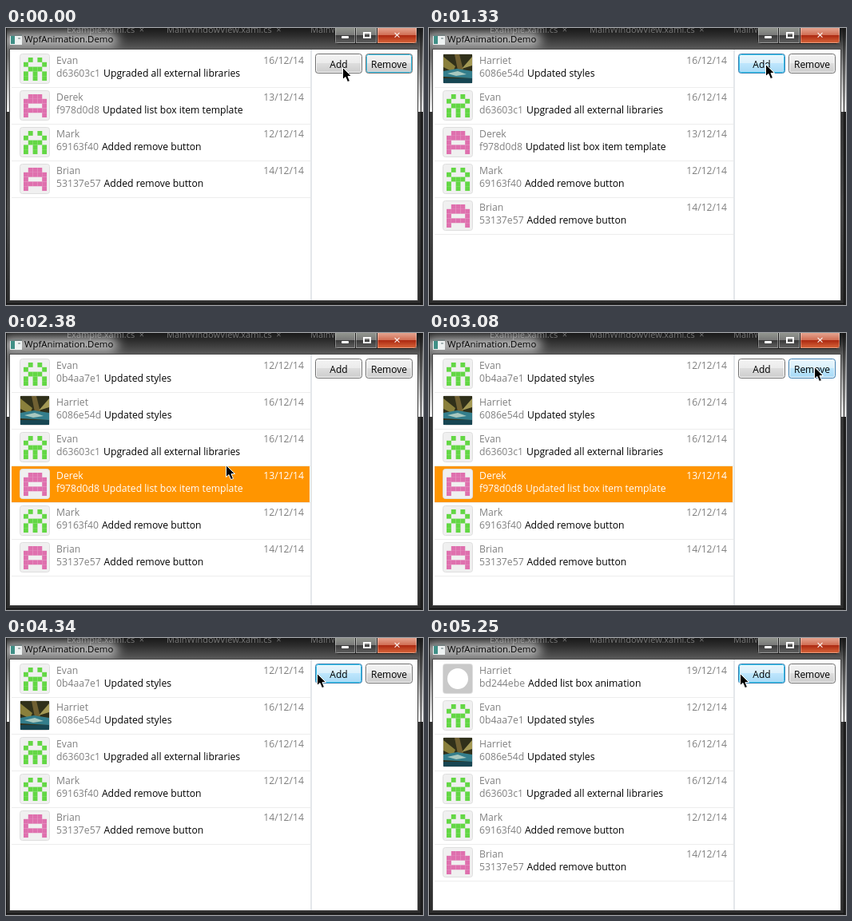
An HTML page with a canvas for the animation above (5.88 s loop, 522 by 347 pixels).

```html
<!DOCTYPE html>
<html lang="en">
<head>
<meta charset="utf-8">
<title>WpfAnimation.Demo</title>
<style>
html, body { margin: 0; width: 100%; height: 100%; overflow: hidden; background: #222; }
canvas { display: block; width: 522px; height: 347px; }
</style>
</head>
<body>
<canvas id="stage" width="522" height="347"></canvas>
<script>
const ctx = document.getElementById('stage').getContext('2d');
const LOOP = 5880, TICK = 70, ROW = 46, TOP = 28;
const GROW = 250, FADE = 400;
const SELECT = 2310, REMOVE = 3360;
const FONT = '"Open Sans", "Noto Sans", sans-serif';

const GREEN = { color: '#63d744', rows: ['.x.x.', 'x...x', '.xxx.', 'x.x.x', 'x.x.x'] };
const PINK = { color: '#df70ae', rows: ['.xxx.', 'xxxxx', 'x...x', 'xxxxx', 'x...x'] };

const items = [
  { name: 'Harriet', date: '19/12/14', hash: 'bd244ebe', note: 'Added list box animation', art: badge, added: 4453 },
  { name: 'Evan', date: '12/12/14', hash: '0b4aa7e1', note: 'Updated styles', art: GREEN, added: 1539 },
  { name: 'Harriet', date: '16/12/14', hash: '6086e54d', note: 'Updated styles', art: photo, added: 570 },
  { name: 'Evan', date: '16/12/14', hash: 'd63603c1', note: 'Upgraded all external libraries', art: GREEN },
  { name: 'Derek', date: '13/12/14', hash: 'f978d0d8', note: 'Updated list box item template', art: PINK, leaves: true },
  { name: 'Mark', date: '12/12/14', hash: '69163f40', note: 'Added remove button', art: GREEN },
  { name: 'Brian', date: '14/12/14', hash: '53137e57', note: 'Added remove button', art: PINK }
];

// Pointer stops: time, x, y
const pointer = [
  [0, 421, 49], [280, 421, 49], [420, 421, 45], [2170, 421, 45],
  [2310, 288, 172], [2380, 275, 165], [2450, 274, 164], [2590, 274, 164],
  [2730, 385, 95], [2870, 481, 43], [2940, 481, 43], [3150, 482, 41],
  [3850, 482, 41], [3990, 450, 30], [4200, 389, 44], [LOOP, 389, 44]
];

const clamp = v => Math.max(0, Math.min(1, v));
const ramp = (t, from, span) => clamp((t - from) / span);
const between = (t, a, b) => t >= a && t < b;

function rect(x, y, w, h, fill) {
  ctx.fillStyle = fill;
  ctx.fillRect(x, y, w, h);
}

function round(x, y, w, h, r, fill, stroke) {
  ctx.beginPath();
  ctx.roundRect(x, y, w, h, r);
  if (fill) { ctx.fillStyle = fill; ctx.fill(); }
  if (stroke) { ctx.strokeStyle = stroke; ctx.lineWidth = 1; ctx.stroke(); }
}

function poly(points, fill) {
  ctx.beginPath();
  points.forEach(([x, y]) => ctx.lineTo(x, y));
  ctx.closePath();
  ctx.fillStyle = fill;
  ctx.fill();
}

function text(str, x, y, color, size = 12.2, align = 'left') {
  ctx.font = `${size}px ${FONT}`;
  ctx.textAlign = align;
  ctx.fillStyle = color;
  ctx.fillText(str, x, y);
  return ctx.measureText(str).width;
}

function shade(y0, y1, stops) {
  const g = ctx.createLinearGradient(0, y0, 0, y1);
  stops.forEach(([p, c]) => g.addColorStop(p, c));
  return g;
}

function glass(y0, y1, [a, b, c, d]) {
  return shade(y0, y1, [[0, a], [0.5, b], [0.5, c], [1, d]]);
}

function caption() {
  const bar = [['#92968f', '#777', '#3a3a3a', '#626262'], ['#e5a48f', '#cf6a50', '#ad2a12', '#d9683c']];
  [[411, 26, 0], [437, 27, 0], [464, 50, 1]].forEach(([x, w, red]) => {
    const r = red ? [0, 0, 4, 0] : x === 411 ? [0, 0, 0, 4] : 0;
    round(x + 0.5, -1.5, w, 21, r, glass(0, 19, bar[red]), '#1c1c1c');
    ctx.strokeStyle = 'rgba(255,255,255,.35)';
    ctx.strokeRect(x + 1.5, -0.5, w - 2, 19);
  });
  round(420, 10, 9, 3, 1, '#fff');
  ctx.strokeStyle = '#fff';
  ctx.lineWidth = 2;
  ctx.strokeRect(448, 6, 8, 6);
  text('×', 489.5, 14, '#fff', 15, 'center');
}

function chrome() {
  rect(0, 0, 522, 347, '#2c2c2c');
  rect(0, 0, 522, 27, shade(0, 27, [[0, '#191919'], [0.35, '#2d2d2d'], [1, '#5c5c5c']]));
  rect(0, 27, 522, 78, shade(27, 105, [[0, '#5c5c5c'], [0.45, '#a5a5a5'], [1, '#f1f1f1']]));
  rect(0, 105, 522, 242, shade(105, 347, [[0, '#343434'], [0.5, '#484848'], [1, '#2b2b2b']]));
  ctx.save();
  ctx.filter = 'blur(0.7px)';
  text('Example.xaml.cs  ×', 76, 6, '#777', 11);
  text('MainWindowView.xaml.cs  ×', 201, 6, '#777', 11);
  text('MainWi', 381, 6, '#777', 11);
  ctx.filter = 'blur(7px)';
  round(-4, 6, 144, 17, 8, 'rgba(235,235,235,.78)');
  ctx.restore();
  rect(0, 0, 1, 347, '#161616');
  rect(519, 0, 1, 347, '#161616');
  rect(520, 105, 2, 242, '#202020');
  rect(0, 345, 520, 1, '#111');
  caption();

  rect(5, 8, 15, 13, '#eef2f2');
  rect(6, 9, 5, 11, '#3f8f86');
  rect(5, 8, 15, 2, '#768080');
  rect(15, 12, 3, 2, '#a7b5b5');
  text('WpfAnimation.Demo', 23, 18, '#000', 11.4);

  rect(4, 26, 512, 316, '#4a4a4a');
  rect(5, 27, 510, 314, '#fff');
  rect(381, 27, 2, 314, '#e4e7ea');
}

function photo(x, y) {
  rect(x, y, 36, 36, '#30301a');
  poly([[x, y + 3], [x + 15, y + 15], [x + 12, y + 22], [x, y + 16]], '#8a803c');
  poly([[x + 14, y], [x + 20, y], [x + 25, y + 20], [x + 18, y + 20]], '#706032');
  poly([[x + 36, y + 3], [x + 36, y + 14], [x + 23, y + 18]], '#a49a55');
  poly([[x, y + 21], [x + 17, y + 18], [x + 36, y + 21], [x + 36, y + 30], [x, y + 28]], '#347e8c');
  poly([[x + 5, y + 24], [x + 18, y + 21], [x + 29, y + 25], [x + 16, y + 27]], '#a8c8bf');
  rect(x, y + 30, 36, 6, '#174653');
}

function badge(x, y) {
  round(x, y, 36, 36, 2, '#c9c9c9');
  ctx.beginPath();
  ctx.arc(x + 18, y + 18, 13, 0, Math.PI * 2);
  ctx.fillStyle = '#fff';
  ctx.fill();
}

function avatar(art, y) {
  round(17.5, y + 4.5, 37, 37, 3, '#f0f0f0', '#dedede');
  if (typeof art === 'function') return art(18, y + 5);
  art.rows.forEach((row, j) => [...row].forEach((cell, i) => {
    if (cell === 'x') rect(22 + i * 5.8, y + 9 + j * 5.8, 5.85, 5.85, art.color);
  }));
}

function drawRow(item, y, alpha, t) {
  ctx.save();
  ctx.globalAlpha = alpha;
  const picked = item.leaves && t >= SELECT;
  const active = picked && t < REMOVE;
  if (picked) rect(7, y + 1, 373, 45, active ? '#ff9500' : '#dddddd');
  const soft = active ? '#fff' : '#808080';
  avatar(item.art, y);
  text(item.name, 63, y + 17, soft);
  text(item.date, 373, y + 17, soft, 12.2, 'right');
  const w = text(item.hash, 63, y + 33, soft);
  text(item.note, 67 + w, y + 33, active ? '#fff' : '#000');
  ctx.restore();
}

function drawList(t) {
  let y = TOP;
  for (const item of items) {
    let size = 1, alpha = 1;
    if (item.added) {
      size = ramp(t, item.added, GROW);
      alpha = ramp(t, item.added + GROW, FADE);
    }
    if (item.leaves) {
      size = 1 - ramp(t, 3490, 150);
      alpha = 1 - ramp(t, REMOVE, 280);
    }
    if (!size) continue;
    const top = Math.round(y);
    if (alpha) drawRow(item, top, alpha, t);
    y += ROW * size;
    rect(7, Math.round(y), 374, 1, '#ededed');
  }
}

function button(label, x, hot, focus, down) {
  const face = (colors, alpha) => {
    ctx.globalAlpha = alpha;
    round(x + 0.5, 32.5, 58, 24, 3, glass(33, 56, colors));
    ctx.globalAlpha = 1;
  };
  face(['#f3f3f3', '#ebebeb', '#dddddd', '#cdcdcd'], 1);
  face(['#eaf6fd', '#d9f0fc', '#bee6fd', '#a7d9f5'], hot);
  if (down) face(['#e5f4fc', '#c4e5f6', '#98d1ef', '#68b3db'], 1);
  round(x + 1.5, 33.5, 56, 22, 2, null, focus ? '#35c5ee' : '#fafafa');
  round(x + 0.5, 32.5, 58, 24, 3, null, hot > 0.5 ? '#3c7fb1' : '#707070');
  text(label, x + 29.5, 49.5, '#000', 12, 'center');
}

function drawButtons(t) {
  const hover = (a, b) => ramp(t, a - TICK, 200) * (1 - ramp(t, b, 180));
  const addHot = Math.max(hover(280, 2170), hover(4130, LOOP));
  const addFocus = between(t, 420, SELECT) || t >= 4270;
  const addDown = t === 420 || t === 1400 || t === 4270;
  button('Add', 387, addHot, addFocus, addDown);
  const removeFocus = t < 420 || between(t, REMOVE, 4270);
  button('Remove', 450, hover(2800, 3920), removeFocus, t === REMOVE);
}

function drawPointer(t) {
  const i = pointer.findIndex(p => p[0] > t);
  const [t0, x0, y0] = pointer[i - 1], [t1, x1, y1] = pointer[i];
  const k = (t - t0) / (t1 - t0);
  ctx.save();
  ctx.translate(Math.round(x0 + (x1 - x0) * k) + 0.5, Math.round(y0 + (y1 - y0) * k) + 0.5);
  ctx.beginPath();
  [[0, 0], [0, 15], [3.5, 12], [6, 18], [9, 17], [6.5, 11], [11, 11]].forEach(p => ctx.lineTo(...p));
  ctx.closePath();
  ctx.fillStyle = '#000';
  ctx.fill();
  ctx.strokeStyle = '#fff';
  ctx.lineWidth = 1;
  ctx.stroke();
  ctx.restore();
}

function draw(now) {
  const t = Math.floor((now % LOOP) / TICK) * TICK;
  chrome();
  drawList(t);
  drawButtons(t);
  drawPointer(t);
}

const start = performance.now();
function frame() {
  draw(performance.now() - start);
  requestAnimationFrame(frame);
}
frame();
</script>
</body>
</html>
```
